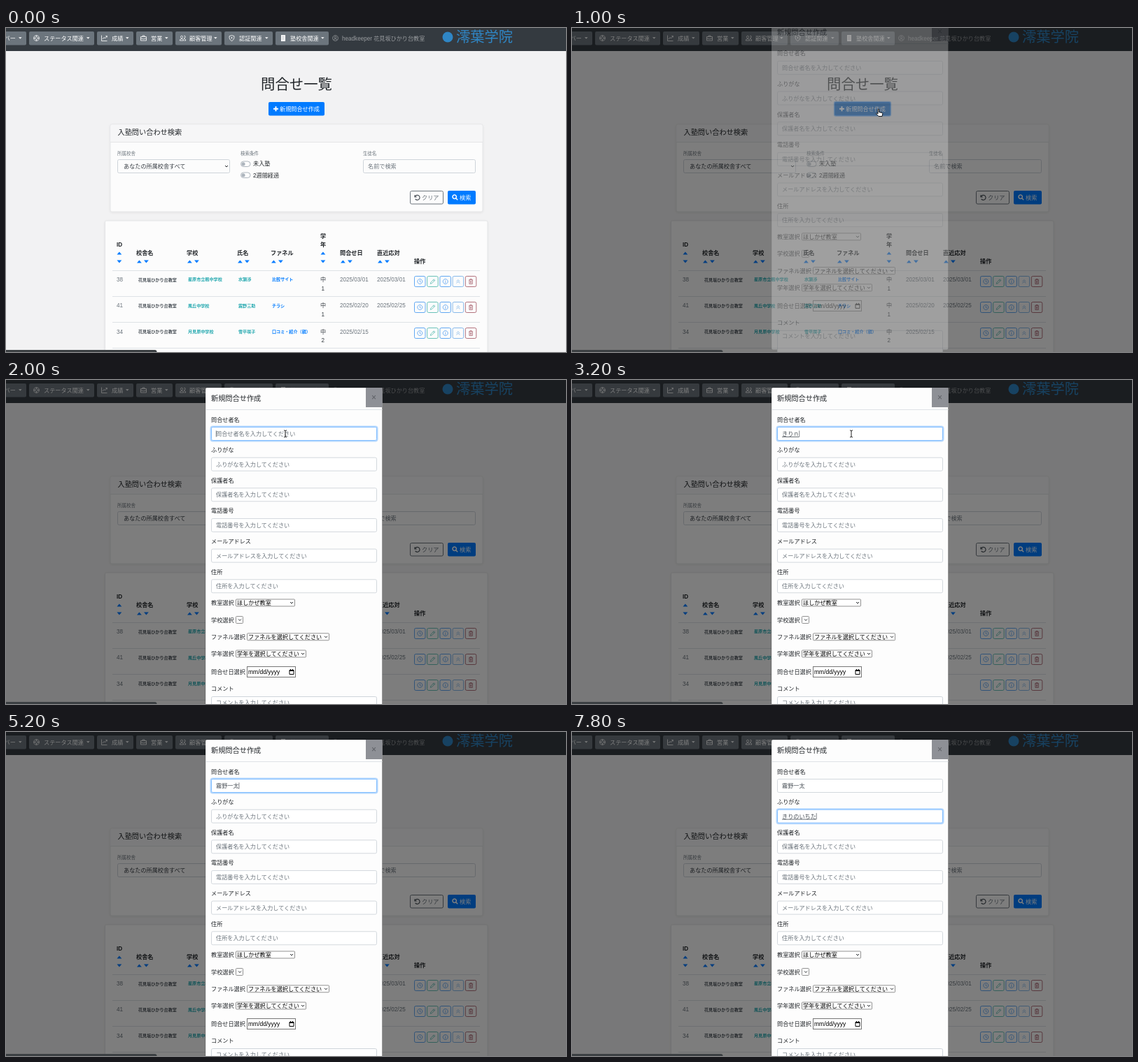
An HTML page for the animation above (8000 ms loop, 800x464 px).

```html
<!DOCTYPE html>
<html lang="ja">
<head>
<meta charset="utf-8">
<title>問合せ一覧</title>
<style>
  html, body { margin: 0; width: 100%; height: 100%; overflow: hidden; background: #f2f2f3; }
  svg { display: block; width: 800px; height: 464px;
        font-family: 'Liberation Sans', 'Noto Sans CJK JP', 'Noto Sans CJK', sans-serif; }
</style>
</head>
<body>
<svg id="stage" viewBox="0 0 800 464"></svg>
<script>
const EM = 8.15, INK = '#212529', GRAY = '#6c757d', BLUE = '#007bff', TEAL = '#17a2b8';
const CARD = '#fcfcfc', EDGE = '#e4e5e7';
const BRANCH = '花見坂ひかり台教室';

// Markup helpers; text is placed by its left edge and vertical centre.
const text = (x, y, s, fill = INK, size = EM, extra = '') =>
  `<text x="${x}" y="${y + size * 0.37}" font-size="${size}" fill="${fill}" ${extra}>${s}</text>`;
const bold = (x, y, s, fill = INK, size = EM) => text(x, y, s, fill, size, 'font-weight="700"');
const box = (x, y, w, h, fill, stroke = 'none', r = 2, extra = '') =>
  `<rect x="${x}" y="${y}" width="${w}" height="${h}" rx="${r}" fill="${fill}" stroke="${stroke}" ${extra}/>`;
const line = (d, stroke, w = 1, extra = '') =>
  `<path d="${d}" fill="none" stroke="${stroke}" stroke-width="${w}" ${extra}/>`;
const shape = (d, fill) => `<path d="${d}" fill="${fill}"/>`;
const group = (id, body) => `<g id="${id}">${body}</g>`;
const chevron = (x, y) => line(`M${x - 2} ${y - 1}l2 2 2-2`, INK);
const up = (x, y) => shape(`M${x} ${y + 2}l3.4-4 3.4 4z`, BLUE);
const down = (x, y) => shape(`M${x} ${y - 2}h6.8l-3.4 4z`, BLUE);

// Icons on a 9px grid
const ICONS = {
  gear: 'M4.5 .6a3.9 3.9 0 1 0 .01 0M4.5 2.7a1.8 1.8 0 1 0 .01 0M4.5 .6v2M4.5 6.4v2M.6 4.5h2M6.4 4.5h2',
  chart: 'M.5 .5v8h8M2 6l2-2.5 1.5 1.3L8.3 1.5M6.3 1.5h2v2',
  bag: 'M.5 2.5h8v5.5h-8zM3 2.5v-1.5h3v1.5M.5 4.8l4 1 4-1',
  people: 'M3 1.2a1.6 1.6 0 1 0 .01 0M6.3 1.2a1.6 1.6 0 1 1-.2 3.1M.3 8c0-3.4 5.4-3.4 5.4 0zM6 5.4c1.8 0 2.7 1 2.7 2.6h-2',
  shield: 'M4.5 .5l3.5 1.2c.2 3.5-1 5.6-3.5 6.9C2 7.3 .8 5.2 1 1.7zM4.5 2.8v2.5M3.5 4h2',
  clock: 'M4.5 1a3.5 3.5 0 1 0 .01 0M4.5 2.5v2.3l1.6 .8',
  pencil: 'M1.3 7.8l.6-2L6.3 1.3l1.5 1.5L3.3 7.2zM5.3 2.3l1.5 1.5',
  info: 'M4.5 1a3.5 3.5 0 1 0 .01 0M4.5 4v2.6M4.5 2.5v.8',
  rise: 'M2 4.5l2.5-2.3L7 4.5M2 7l2.5-2.3L7 7',
  trash: 'M1.5 2.3h6M3.3 2.3v-1.2h2.4v1.2M2.3 2.5v5.5h4.4V2.5M3.8 3.8v3M5.2 3.8v3',
  user: 'M4.5 .6a3.9 3.9 0 1 0 .01 0M4.5 2.2a1.4 1.4 0 1 0 .01 0M2 7.3c.5-2.2 4.5-2.2 5 0',
  undo: 'M1 1v2.7h2.7M1.2 3.5A3.5 3.5 0 1 1 1.7 6.6',
  search: 'M3.7 1a2.7 2.7 0 1 0 .01 0M5.7 5.7L8.2 8.2'
};
const icon = (name, x, y, color, w = 0.8) => line(ICONS[name], color, w, `transform="translate(${x} ${y})"`);

function navbar() {
  const menus = [
    [-10, 39, -2.5, 'バー'], [33, 93, 54, 'ステータス関連', 'gear'], [130, 52, 151, '成績', 'chart'],
    [186, 52, 207, '営業', 'bag'], [242, 66, 262, '顧客管理', 'people'],
    [312, 69, 333, '認証関連', 'shield'], [385, 76, 406, '塾校舎関連']
  ];
  const buttons = menus.map(([x, w, tx, label, ic]) =>
    box(x, 5, w, 19.5, GRAY) + text(tx, 14.5, label, '#fff') +
    shape(`M${x + w - 11} 13.2h4.6l-2.3 2.4z`, '#fff') +
    (ic ? icon(ic, x + 6, 10, '#fff') : '')).join('');
  const building = shape('M393 10h6v9h-6z', '#fff') +
    line('M394.5 12h3M394.5 14h3M394.5 16h3', GRAY, 0.8, 'stroke-dasharray="1 1"');
  return box(0, 0, 800, 33, '#343a40', 'none', 0) + buttons + building +
    icon('user', 466, 10, '#999c9f') + text(480, 14.5, 'headkeeper ' + BRANCH, '#999c9f') +
    '<circle cx="631" cy="13" r="7.5" fill="#2f86c5"/>' + text(643, 12.5, '澪葉学院', '#2f86c5', 20.3);
}

function searchCard() {
  const toggle = y => box(335.5, y - 4, 13.5, 7.5, '#fff', '#adb5bd', 3.8) +
    `<circle cx="339" cy="${y - 0.2}" r="2.6" fill="#adb5bd"/>`;
  return box(149, 138, 532, 125, CARD, EDGE, 2, 'filter="url(#soft)"') +
    box(149.5, 138.5, 531, 25, '#f6f6f7') + line('M149 163.5H681', EDGE) +
    text(159.5, 149.6, '入塾問い合わせ検索', INK, 10.2) +
    text(159, 180, '所属校舎', GRAY, 6.5) + text(335, 180, '検索条件', GRAY, 6.5) + text(510, 180, '生徒名', GRAY, 6.5) +
    box(159.5, 188.5, 160, 19, CARD, '#ced4da') + text(168, 198, 'あなたの所属校舎すべて', '#343a40') + chevron(315, 198) +
    toggle(195) + text(353, 194, '未入塾') + toggle(211) + text(353, 210.5, '2週間経過') +
    box(510.5, 188.5, 160, 19, CARD, '#ced4da') + text(517, 198, '名前で検索', GRAY) +
    box(577.5, 233.5, 47, 18.5, CARD, GRAY) + icon('undo', 583, 238.3, '#495057', 1.2) + text(594, 242.7, 'クリア', GRAY) +
    box(631, 233, 40, 19.5, BLUE) + icon('search', 637, 238, '#fff', 1.5) + text(648, 242.7, '検索', '#fff');
}

function table() {
  const heads = [[186, '校舎名'], [258, '学校'], [330, '氏名'], [378, 'ファネル'], [477, '問合せ日'], [530, '直近応対']];
  const rows = [
    ['38', '星原市立楓中学校', '水瀬渉', '比較サイト', '1', '2025/03/01', '2025/03/01'],
    ['41', '風丘中学校', '霧野三助', 'チラシ', '1', '2025/02/20', '2025/02/25'],
    ['34', '月見原中学校', '雪平咲子', '口コミ・紹介（親）', '2', '2025/02/15', '']
  ];
  const actions = [['clock', '#3a93f0'], ['pencil', '#45b3a8'], ['info', '#3a93f0'], ['rise', '#6aa9e6'], ['trash', '#a0505e']];
  let s = box(141.5, 276, 546.5, 200, CARD, EDGE, 2, 'filter="url(#soft)"');
  s += bold(158, 310.4, 'ID') + up(158.5, 322.6) + down(158.5, 334.6);
  s += bold(449, 297.8, '学') + bold(449, 310, '年') + up(449.5, 322.6) + down(449.5, 334.6);
  for (const [x, label] of heads) s += bold(x, 322.4, label) + up(x + 1, 334.6) + down(x + 11, 334.6);
  s += bold(583, 334.4, '操作') + line('M152 347.5H677', '#dee2e6');
  rows.forEach(([id, school, name, funnel, grade, asked, replied], i) => {
    const y = 360.2 + i * 37.2, top = 355.5 + i * 37;
    s += text(158, y, id, GRAY) + bold(189, y + 0.3, BRANCH, '#495057', 6.1) +
      bold(260, y, school, '#20a7ae', 6.1) + bold(332, y, name, '#20a7ae', 6.1) + bold(380, y, funnel, BLUE, 6.1) +
      text(449, y, '中', '#343a40') + text(450.5, y + 12.3, grade, '#343a40') +
      text(477, y, asked, GRAY) + text(530, y, replied, GRAY) + line(`M152 ${top + 29}H677`, '#dee2e6');
    actions.forEach(([name, color], k) => {
      const x = 583.5 + k * 18.2;
      s += box(x, top, 15.5, 15, CARD, color, 2, 'stroke-width=".8"') + icon(name, x + 3.3, top + 3, color, 0.7);
    });
  });
  return s;
}

const FIELDS = ['問合せ者名', 'ふりがな', '保護者名', '電話番号', 'メールアドレス', '住所'];
const fieldY = i => 77 + i * 43.65;
const hint = label => label + 'を入力してください';

function modal() {
  const select = (y, label, x, w, value) => text(293, y, label) +
    box(x + 0.5, y - 5, w - 1, 10, '#fff', '#767676', 1, 'stroke-width=".8"') +
    text(x + 2, y, value, '#000') + chevron(x + w - 5, y);
  return box(285, 11, 252.5, 470, '#fdfdfd', 'rgba(0,0,0,.2)', 2) +
    text(293, 26, '新規問合せ作成', INK, 10.2) + line('M285 42.5H537.5', '#dee2e6') +
    box(514, 11, 23.5, 28, '#8e9096', 'none', 0) + text(522, 25, '×', '#5b5d62', 12) +
    FIELDS.map((label, i) => text(293, fieldY(i) - 20.5, label) + group('field' + i, '')).join('') +
    select(319, '教室選択', 328, 85, 'ほしかぜ教室') + select(343.5, '学校選択', 328, 11, '') +
    select(367.8, 'ファネル選択', 344, 118, 'ファネルを選択してください') +
    select(392, '学年選択', 328, 101, '学年を選択してください') +
    text(293, 418, '問合せ日選択') + box(344.5, 410.5, 69, 15, '#fff', '#767676', 0) +
    text(346, 418, 'mm/dd/yyyy', '#000', 8.5) +
    line('M405 415.5h6v6h-6zM405 416.5h6M406.5 414v1.5M409.5 414v1.5', '#000') +
    text(293, 442, 'コメント') + box(293.5, 453.5, 236, 40, '#fff', '#ced4da') + text(300, 461.5, hint('コメント'), GRAY);
}

const $ = id => document.getElementById(id);
$('stage').innerHTML =
  `<defs><filter id="soft" x="-5%" y="-5%" width="110%" height="115%">
    <feDropShadow dx="0" dy="1" stdDeviation="1.5" flood-opacity=".07"/></filter></defs>` +
  box(0, 0, 800, 464, '#f2f2f3', 'none', 0) + navbar() + text(364, 80.6, '問合せ一覧', INK, 20.4) +
  box(375, 106, 80, 19.5, BLUE, 'none', 2, 'id="create" stroke-width="2.5"') +
  line('M382 115.7h7M385.5 112.2v7', '#fff', 1.9) + text(391, 115.5, '新規問合せ作成', '#fff') +
  searchCard() + table() +
  box(0, 0, 800, 464, '#000', 'none', 0, 'id="shade"') + group('modal', modal()) +
  box(-4, 461, 219.5, 8, '#3c4043', 'none', 3) +
  group('arrow', '<path d="M0 0v9.5l2.2-2 1.5 3.4 1.6-.7-1.5-3.3h3z" fill="#000" stroke="#fff" stroke-width=".7"/>') +
  group('hand', '<path d="M-1 0c0-1.2 1.7-1.2 1.7 0v3.5l4 .9c.9 .3 1.2 .8 1 1.7l-.7 3.4h-5L-3 6.3c-.6-1 .6-1.8 1.3-1l.7 .7z" fill="#fff" stroke="#000" stroke-width=".9"/>') +
  group('beam', line('M-2-5q2 0 2 1.2 0-1.2 2-1.2M0-4v8M-2 5q2 0 2-1.2 0 1.2 2 1.2', '#222'));

// [time, text, still composing]
const TYPED = [
  [[0, ''], [2600, 'ｋ', 1], [2800, 'き', 1], [3000, 'きり', 1], [3200, 'きりｎ', 1], [3400, 'きりの', 1],
   [3600, 'きりのい', 1], [3800, 'きりのいｔ', 1], [4000, 'きりのいち', 1], [4400, 'きりのいちた', 1],
   [4600, '霧野一太', 1], [5000, '霧野一太']],
  [[0, ''], [6000, 'ｋ', 1], [6200, 'き', 1], [6400, 'きり', 1], [6600, 'きりｎ', 1], [6800, 'きりの', 1],
   [7000, 'きりのい', 1], [7400, 'きりのいｔ', 1], [7600, 'きりのいち', 1], [7800, 'きりのいちた', 1]]
];
const POINTER = [
  [0, null], [200, 'arrow', 470, 200], [400, 'arrow', 448, 145], [600, 'hand', 438, 117],
  [1200, 'arrow', 409.5, 104], [1400, 'beam', 402, 80], [1600, 'beam', 399, 77], [3800, null]
];
const latest = (list, t) => list.filter(e => e[0] <= t).pop();
const unit = v => Math.min(1, Math.max(0, v));

function drawField(i, t, focus) {
  const y = fieldY(i), [, value, composing] = latest(TYPED[i] || [[0, '']], t), on = focus === i;
  const caretX = 300.3 + value.length * EM;
  $('field' + i).innerHTML =
    (on ? box(292.5, y - 10.5, 238, 21, 'none', 'rgba(0,123,255,.28)', 3, 'stroke-width="2"') : '') +
    box(293.5, y - 9.5, 236, 19, '#fff', on ? '#80bdff' : '#d3d8dd') +
    (value ? text(300, y, value, '#495057', EM, composing ? 'text-decoration="underline"' : '')
           : text(300, y, hint(FIELDS[i]), GRAY)) +
    (on ? line(`M${caretX} ${y - 4.5}v9`, '#495057', 0.7) : '');
}

function render(t) {
  // The shade fades in first, then the dialog fades and slides down.
  $('shade').setAttribute('opacity', 0.5 * unit((t - 786) / 150));
  const slide = (1 - unit((t - 960) / 300)) ** 1.65;
  $('modal').setAttribute('opacity', unit((t - 960) / 150));
  $('modal').setAttribute('transform', `translate(0 ${-25.5 * slide})`);

  const pressed = t >= 600;
  $('create').setAttribute('fill', pressed ? '#0062cc' : BLUE);
  $('create').setAttribute('stroke', pressed ? 'rgba(0,123,255,.5)' : 'none');

  const focus = t < 1800 ? -1 : t < 5600 ? 0 : 1;
  FIELDS.forEach((_, i) => drawField(i, t, focus));

  const [, kind, x, y] = latest(POINTER, t);
  for (const id of ['arrow', 'hand', 'beam']) $(id).setAttribute('display', id === kind ? 'inline' : 'none');
  if (kind) $(kind).setAttribute('transform', `translate(${x} ${y})`);
}

const TICK = 200, LOOP = 8000;
let shown = -1;
function frame() {
  const t = Math.floor(performance.now() % LOOP / TICK) * TICK;
  if (t !== shown) render(shown = t);
  requestAnimationFrame(frame);
}
frame();
</script>
</body>
</html>
```
